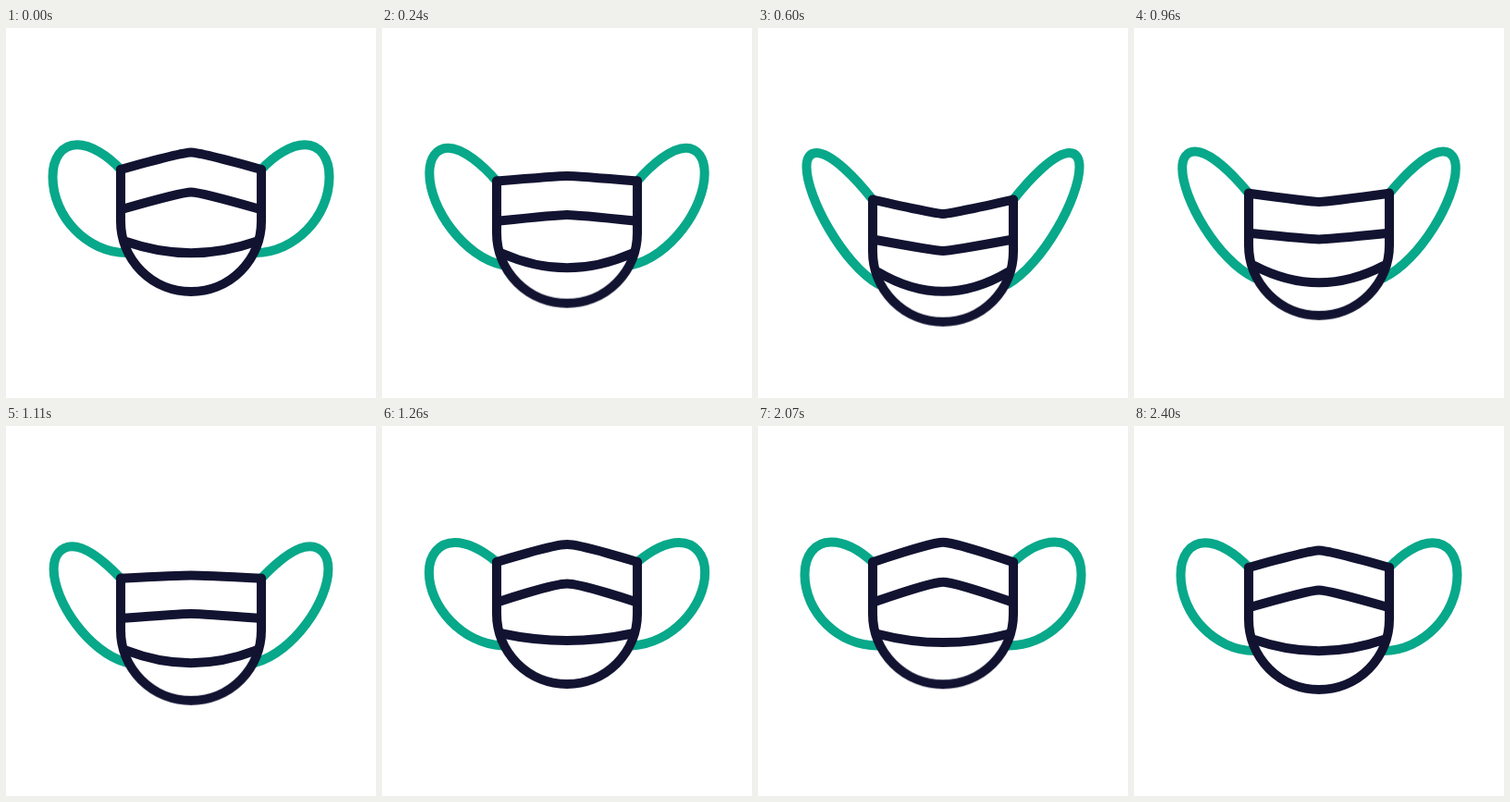
Write an HTML page that moves like this. It is 400 px wide and 400 px high and loops after 2.43 s.

```html
<!DOCTYPE html>
<html lang="en">
<head>
<meta charset="utf-8">
<title>Face mask</title>
<style>
  html, body { margin: 0; width: 100%; height: 100%; overflow: hidden; background: #fff; }
  svg { display: block; width: 100%; height: 100%; }
  path {
    fill: none;
    stroke: #121331;
    stroke-width: 10;
    stroke-linecap: round;
    stroke-linejoin: round;
    animation: 2430ms infinite;
  }
  .loop { stroke: #08a88a; animation-name: loop; }
  .body { animation-name: body; }
  .edge { animation-name: edge; }
  .fold { animation-name: fold; }
  .chin { animation-name: chin; }

  /* rest -> lowered -> raised -> rest */
  @keyframes body {
    0%, 100% { transform: translateY(0); animation-timing-function: cubic-bezier(.333, 0, .667, 1); }
    23.457% { transform: translateY(32.7px); animation-timing-function: cubic-bezier(.75, 0, .33, 1); }
    66.667% { transform: translateY(-13.8px); animation-timing-function: cubic-bezier(.333, 0, .667, 1); }
  }
  @keyframes edge {
    0%, 100% {
      d: path("M124 153 C124 153 190 134.5 200 134.5 C210 134.5 276 153 276 153");
      animation-timing-function: cubic-bezier(.333, 0, .667, 1);
    }
    23.457% {
      d: path("M124 185.7 C124 185.7 192 201 200 201 C208 201 276 185.7 276 185.7");
      animation-timing-function: cubic-bezier(.75, 0, .33, 1);
    }
    66.667% {
      d: path("M124 139.2 C124 139.2 183 113.3 200 113.3 C217 113.3 276 139.2 276 139.2");
      animation-timing-function: cubic-bezier(.333, 0, .667, 1);
    }
  }
  @keyframes fold {
    0%, 100% {
      d: path("M127 195.5 C127 195.5 190 177.5 200 177.5 C210 177.5 273 195.5 273 195.5");
      animation-timing-function: cubic-bezier(.333, 0, .667, 1);
    }
    23.457% {
      d: path("M127 229 C127 229 192 241 200 241 C208 241 273 229 273 229");
      animation-timing-function: cubic-bezier(.75, 0, .33, 1);
    }
    66.667% {
      d: path("M127 181.8 C127 181.8 183 156.3 200 156.3 C217 156.3 273 181.8 273 181.8");
      animation-timing-function: cubic-bezier(.333, 0, .667, 1);
    }
  }
  @keyframes chin {
    0%, 100% {
      d: path("M130 231 Q200 255.5 270 231");
      animation-timing-function: cubic-bezier(.333, 0, .667, 1);
    }
    23.457% {
      d: path("M130 264 Q200 305.5 270 264");
      animation-timing-function: cubic-bezier(.75, 0, .33, 1);
    }
    66.667% {
      d: path("M130 216.5 Q200 226 270 216.5");
      animation-timing-function: cubic-bezier(.333, 0, .667, 1);
    }
  }
  @keyframes loop {
    0%, 100% {
      d: path("M124 153 C110 138 92 126.3 77 126.3 C60 126.3 50.5 141 50.5 161 C50.5 204 88 243 130 243");
      animation-timing-function: cubic-bezier(.333, 0, .667, 1);
    }
    23.457% {
      d: path("M124 185.7 C107 164 80 135 63 135 C56 135 52.5 141 52.5 150 C52.5 183 92 255 130 277");
      animation-timing-function: cubic-bezier(.75, 0, .33, 1);
    }
    66.667% {
      d: path("M124 139.2 C112 131 98 124.3 82 124.3 C63 124.3 50.5 139 50.5 160 C50.5 198 86 231 130 229.5");
      animation-timing-function: cubic-bezier(.333, 0, .667, 1);
    }
  }
</style>
</head>
<body>
<svg viewBox="0 0 400 400">
  <path class="loop"/>
  <g transform="matrix(-1 0 0 1 400 0)"><path class="loop"/></g>
  <path class="body" d="M124 153 V209 A76 76 0 0 0 276 209 V153"/>
  <path class="edge"/>
  <path class="fold"/>
  <path class="chin"/>
</svg>
</body>
</html>
```
